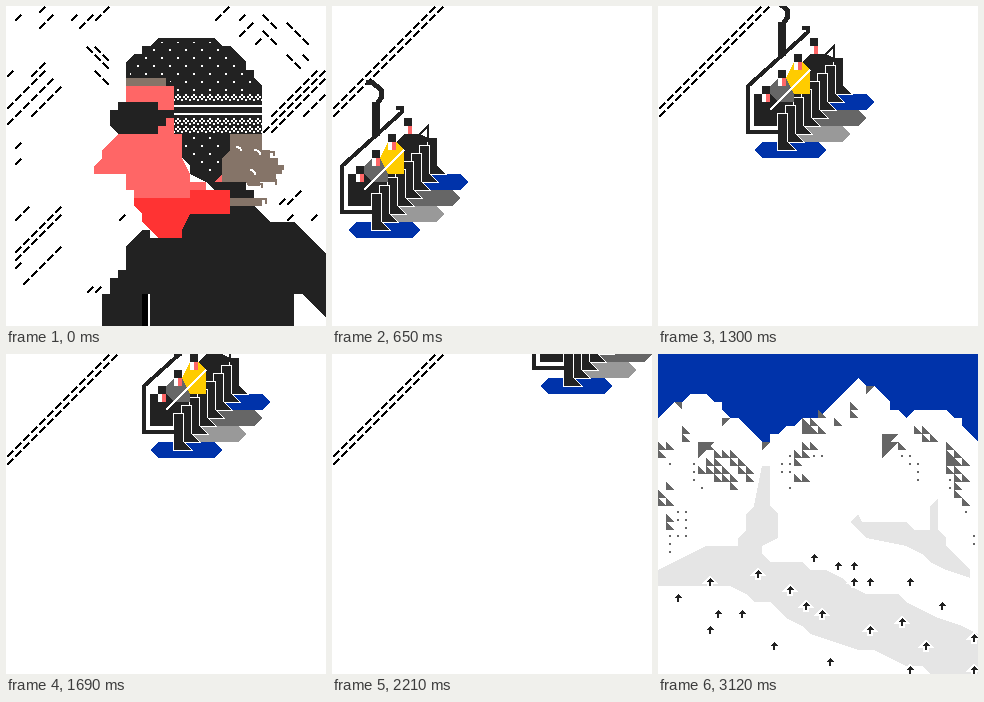
Write an HTML page without scripts that moves like this. It is 320x320 px and loops after 3250 ms.

```html
<!DOCTYPE html>
<html lang="en">
<head>
<meta charset="utf-8">
<title>Ski day</title>
<style>
  html, body { margin: 0; width: 100%; height: 100%; overflow: hidden; background: #fff; }
  svg { display: block; width: 100vw; height: 100vh; shape-rendering: crispEdges; }

  .scene, .gust { visibility: hidden; animation: 3250ms -2ms step-end infinite; }
  .rider { animation-name: rider; }
  .lift { animation-name: lift; }
  .valley { animation-name: valley; }
  @keyframes rider { 0% { visibility: visible } 20%, 100% { visibility: hidden } }
  @keyframes lift { 0% { visibility: hidden } 20% { visibility: visible } 80%, 100% { visibility: hidden } }
  @keyframes valley { 0% { visibility: hidden } 80%, 100% { visibility: visible } }

  /* one 130 ms beat each */
  .gust { animation-name: beat; animation-delay: calc(var(--i) * 130ms - 3252ms); }
  @keyframes beat { 0% { visibility: visible } 4%, 100% { visibility: hidden } }

  .chair { animation: ride 3250ms -2ms steps(25) infinite; }
  @keyframes ride { from { transform: translate(-128px, 128px) } to { transform: translate(272px, -272px) } }

  .skiers use { animation: ski 3250ms -2ms infinite; }
  @keyframes ski {
    0%, 80% { transform: none; animation-timing-function: steps(5, jump-none) }
    100% { transform: translate(var(--to, 0px, 0px)) }
  }

  .ink { fill: #222 }
  .line { fill: none; stroke: #222 }
  .snow path { fill: none; stroke-width: 4; stroke: url(#slash) }
  .snow .back { stroke: url(#backslash) }
  .cells path { fill: none; stroke-width: 8 }
</style>
</head>
<body>
<svg viewBox="0 0 320 320">
  <defs>
    <pattern id="slash" width="8" height="8" patternUnits="userSpaceOnUse">
      <path d="M1 7L7 1" stroke="#000" stroke-width="2"/>
    </pattern>
    <pattern id="backslash" width="8" height="8" patternUnits="userSpaceOnUse">
      <path d="M1 1L7 7" stroke="#000" stroke-width="2"/>
    </pattern>
    <pattern id="knit" width="16" height="16" patternUnits="userSpaceOnUse">
      <path d="M11 3h2v2h-2zM3 11h2v2h-2z" fill="#fff"/>
    </pattern>
    <pattern id="lace" width="8" height="8" patternUnits="userSpaceOnUse">
      <path d="M3 0h2v2h-2zM1 2h2v2h-2zM5 2h2v2h-2zM3 4h2v2h-2zM0 5h1v2h-1zM7 5h1v2h-1z" fill="#fff"/>
    </pattern>
    <pattern id="rockTop" width="8" height="8" patternUnits="userSpaceOnUse"><path d="M0 0h8L0 8z" fill="#666"/></pattern>
    <pattern id="rock" width="8" height="8" patternUnits="userSpaceOnUse"><path d="M0 0l8 8H0z" fill="#666"/></pattern>
    <pattern id="scree" width="8" height="8" patternUnits="userSpaceOnUse"><path d="M3 5h2v2h-2z" fill="#666"/></pattern>

    <g id="gustA" class="snow">
      <path d="M40 0l-8 8M48 8l-16 16M16 8l-8 8M72 8l-8 8M104 0l-16 16M88 8l-16 16
        M8 64l-8 8M40 56l-16 16M40 64l-40 40M48 72l-48 48M56 80l-24 24M40 80l-32 32M40 96l-16 16M16 136l-8 8M16 152l-8 8
        M24 200l-16 16M56 200l-48 48M48 216l-40 40M56 208l-40 40M56 240l-40 40M16 256l-8 8M120 208l-8 8M88 280l-8 8M96 280l-8 8
        M224 0l-16 16M240 8l-8 8M248 16l-16 16M256 32l-8 8
        M320 64l-64 64M320 72l-56 56M312 64l-48 48M320 88l-24 24
        M296 184l-16 16M280 192l-8 8M312 208l-8 8M288 208l-8 8"/>
      <path class="back" d="M80 40l24 24M88 40l16 16M88 64l16 16M256 8l16 16M280 16l24 24M256 24l16 16M280 48l16 16M296 48l8 8"/>
    </g>
    <g id="gustB" class="snow">
      <path d="M8 0l-8 8M48 8l-8 8M80 16l-24 24M72 32l-16 16M80 40l-16 16
        M248 8l-8 8M288 16l-16 16M312 8l-8 8M320 24l-8 8
        M280 48l-24 24M296 48l-16 16M288 64l-32 32M280 80l-24 24M304 80l-32 32M288 104l-24 24
        M48 184l-8 8M16 232l-8 8M40 232l-8 8M64 224l-8 8M72 248l-8 8M40 248l-8 8M48 296l-8 8M104 296l-8 8
        M304 192l-16 16M312 192l-24 24M320 208l-16 16M320 224l-8 8"/>
      <path class="back" d="M0 64l16 16M0 80l8 8M0 96l8 8M24 8l16 16M64 8l16 16M80 24l16 16M72 40l8 8M88 40l8 8M104 0l24 24M112 0l16 16M168 16l16 16M184 8l24 24M200 16l16 16M216 24l8 8M232 32l8 8"/>
    </g>

    <path id="board" d="M64 176l8-8h56l8 8-8 8h-56z"/>
    <path id="leg" d="M88 140h9v28l8 8h-17z" fill="#222" stroke="#fff" stroke-width="2" paint-order="stroke"/>
    <g id="legs"><use href="#leg" x="8" y="-8"/><use href="#leg"/></g>
    <g id="head">
      <path class="ink" d="M72 112h8v8h-8z"/>
      <path d="M72 120h4v8h-4z" fill="#fff"/><path d="M76 120h4v8h-4z" fill="#f66"/>
    </g>
    <path id="skier" d="M0-4l4 4h-3v4h-2v-4h-3z" fill="#222" stroke="#fff" stroke-width="4" paint-order="stroke"/>
  </defs>

  <g class="scene rider">
    <use class="gust" href="#gustA" style="--i:0"/>
    <use class="gust" href="#gustA" style="--i:1" x="-16" y="24"/>
    <use class="gust" href="#gustB" style="--i:2" x="16" y="-16"/>
    <use class="gust" href="#gustB" style="--i:3"/>
    <use class="gust" href="#gustB" style="--i:4" x="-16" y="24"/>

    <!-- hair -->
    <path d="M224 128h32v16h8v8h8v8h4v8h-6v8h-16v4h-12l-2-4h-24v-24l8-8zM224 192h32v8h-32zM120 72h40v8h-40z" fill="#857468"/>
    <path d="M260 146h8v4M270 160h7v4M262 174h8v5M250 178h6v4M254 193h6v5" fill="none" stroke="#857468" stroke-width="2"/>
    <path d="M248 144q6 0 6 5M244 164q5 0 5 5M230 141q5 0 5 4" fill="none" stroke="#fff" stroke-width="2"/>
    <!-- coat -->
    <path class="ink" d="M136 224h8v8h32v-24h48v-8h24l16 16h24l32 32v64l-24-24h-8v32H96v-32h8v-16h8v-8h8v-24l8-8z"/>
    <path d="M136 288h6v32h-6z"/>
    <path d="M142 288h2v32h-2z" fill="#fff"/>
    <path class="ink" d="M208 176h32v8h8v8h-24v-8h-16z"/>
    <!-- face and scarf -->
    <path d="M120 80h48v48h8v24l8 16v8h16v8h-16v8h-56v-8h-8v-16H88v-8l8-8v-8l16-16h8zM208 168h8v8h-8z" fill="#f66"/>
    <path d="M128 192h56v-8h40v24h-40l-8 16v8h-24l-8-8-8-8v-8l-8-8z" fill="#f33"/>
    <!-- hat -->
    <path class="ink" d="M152 32h56l8 8h8l16 16v8h8v8l8 8v48h-32v16l-8 8v16l-8 8v8l-8-8-16-8v-8l-8-8v-24h-8V80h-8v-8h-40V56l8-8h8v-8h8z"/>
    <path d="M152 36h56l24 16 8 16 8 12v8h-80v-8l-8-8h-36V60l16-16zM176 128h40v24l-8 20-16-8-16-24z" fill="url(#knit)"/>
    <path d="M168 88h88v7h-88zM168 112h88v16h-88z" fill="url(#lace)"/>
    <path d="M168 99h88v2h-88zM168 107h88v2h-88z" fill="#fff"/>
    <path class="ink" d="M112 96h40v8h16v8h-8v8h-8v8h-40l-8-8v-16h8z"/>
  </g>

  <g class="scene lift">
    <g class="snow"><path d="M104 0L0 104M112 0L0 112"/></g>
    <g class="chair">
      <use href="#board" x="48" y="-48" fill="#03a"/>
      <use href="#board" x="40" y="-32" fill="#666"/>
      <use href="#board" x="24" y="-16" fill="#999"/>
      <use href="#board" fill="#03a"/>
      <path class="ink" d="M64 120h16l32-32 8-8h16l16 8v12l-48 48-16 4H64z"/>
      <use href="#legs" x="48" y="-48"/>
      <use href="#legs" x="32" y="-32"/>
      <use href="#legs" x="16" y="-16"/>
      <use href="#legs"/>
      <path d="M80 112l8-8h16v24h-16l-8-8z" fill="#666"/>
      <path d="M96 104l8-16h8l8 8v24h-16z" fill="#fc0"/>
      <use href="#head" x="48" y="-48"/>
      <use href="#head" x="32" y="-32"/>
      <use href="#head" x="16" y="-16"/>
      <use href="#head"/>
      <path d="M80 136L120 96" stroke="#fff" stroke-width="2"/>
      <path class="line" stroke-width="2" d="M120 96l24-24v16"/>
      <path class="line" stroke-width="4" d="M112 54h6v4L58 112v46h30"/>
      <path class="line" stroke-width="8" d="M92 48v34"/>
      <path class="line" stroke-width="5" d="M82 28h6l9 8v8l-4 6"/>
    </g>
  </g>

  <g class="scene valley">
    <path d="M0 0h320v320H0z" fill="#fff"/>
    <path d="M0 0h320v88l-16-16v-8h-8l-8-8h-32l-8 8-8-8h-8v-8l-16-16h-8l-8-8-32 32-8 8h-16l-8 8h-8l-8 8h-8v8h-8l-24-24h-8l-8-8v-8h-8l-8-8h-16l-8 8h-8l-16 16z" fill="#03a"/>
    <path d="M104 112h8v40l8 8v24l-16 8v8l8 8h32l8 8h16l16 8 8 8 16 8h32l8 8 16 8 16 8 24 8 16 8v40h-48l-8-8h-16l-16-8-16-8h-16l-24-8-24-8-8-8-16-8-16-16h-16l-8-8-16-8H0v-16l16-8 16-8 16-8h32v-8l8-8v-16l8-8z
      M192 168l8-8 4 8h44l8 8h16v-24l8-8v32l8 8v8l24 24v8l-24-8-16-8-8-8-16-8-40-8z" fill="#e5e5e5"/>
    <g class="cells">
      <path stroke="url(#rockTop)" d="M208 36h8M40 92h16M40 100h8M224 84h16M224 92h16M224 100h8"/>
      <path stroke="#666" d="M40 92h8M224 84h8M224 92h8M144 76h8M288 108h8"/>
      <path stroke="url(#rock)" d="M24 76h8M24 84h8M0 92h16M0 100h8M48 92h8M56 100h24M48 108h16M72 108h16M40 116h24M64 116h8M80 116h16M56 124h24M88 124h8M72 132h8
        M8 132h8M0 140h8M8 148h8M0 148h8M8 164h8M8 172h8
        M192 52h8M192 60h8M176 68h8M160 60h8M144 68h8M152 76h8M152 68h8M160 76h8M144 92h16M136 100h8M144 100h8M136 108h8M144 124h8M136 124h8
        M256 76h8M264 76h8M264 84h8M272 84h8M240 92h8M288 92h8M288 100h16M288 116h16M296 108h16M304 124h8M296 124h8M296 132h8M296 140h8M304 148h8"/>
      <path stroke="url(#scree)" d="M8 108h8M32 108h8M32 116h8M32 124h8M40 132h8M16 156h16M16 164h16M8 180h24M8 188h8M24 172h8M8 196h8
        M128 100h8M120 108h16M128 116h8M120 116h8M128 132h8M152 100h16M152 92h8
        M240 100h16M248 108h16M256 116h8M256 124h8M288 124h8M288 132h8M304 156h8M312 180h8M312 188h8"/>
    </g>
    <path d="M16 48h8v8zM64 64h8l-8 8zM104 88h8l-8 8z" fill="#666"/>
    <g class="skiers">
      <use href="#skier" x="20" y="244"/>
      <use href="#skier" x="36" y="244" style="--to:16px,-16px"/>
      <use href="#skier" x="76" y="220" style="--to:24px,0px"/>
      <use href="#skier" x="60" y="260"/>
      <use href="#skier" x="92" y="260" style="--to:-8px,0px"/>
      <use href="#skier" x="108" y="228" style="--to:24px,8px"/>
      <use href="#skier" x="148" y="212" style="--to:8px,-8px"/>
      <use href="#skier" x="172" y="220" style="--to:8px,-8px"/>
      <use href="#skier" x="124" y="276" style="--to:24px,-24px"/>
      <use href="#skier" x="116" y="284" style="--to:-64px,-8px"/>
      <use href="#skier" x="124" y="308" style="--to:-8px,-16px"/>
      <use href="#skier" x="156" y="292" style="--to:8px,-32px"/>
      <use href="#skier" x="164" y="316" style="--to:8px,-8px"/>
      <use href="#skier" x="196" y="300" style="--to:56px,16px"/>
      <use href="#skier" x="188" y="260" style="--to:24px,16px"/>
      <use href="#skier" x="220" y="268" style="--to:24px,0px"/>
      <use href="#skier" x="228" y="220" style="--to:-32px,8px"/>
      <use href="#skier" x="220" y="228" style="--to:-24px,-16px"/>
      <use href="#skier" x="236" y="228" style="--to:-24px,0px"/>
      <use href="#skier" x="268" y="244" style="--to:-16px,-16px"/>
      <use href="#skier" x="284" y="260" style="--to:0px,-8px"/>
      <use href="#skier" x="300" y="260" style="--to:32px,16px"/>
      <use href="#skier" x="316" y="276" style="--to:0px,8px"/>
      <use href="#skier" x="252" y="284" style="--to:16px,8px"/>
      <use href="#skier" x="300" y="300" style="--to:16px,16px"/>
    </g>
  </g>
</svg>
</body>
</html>
```
